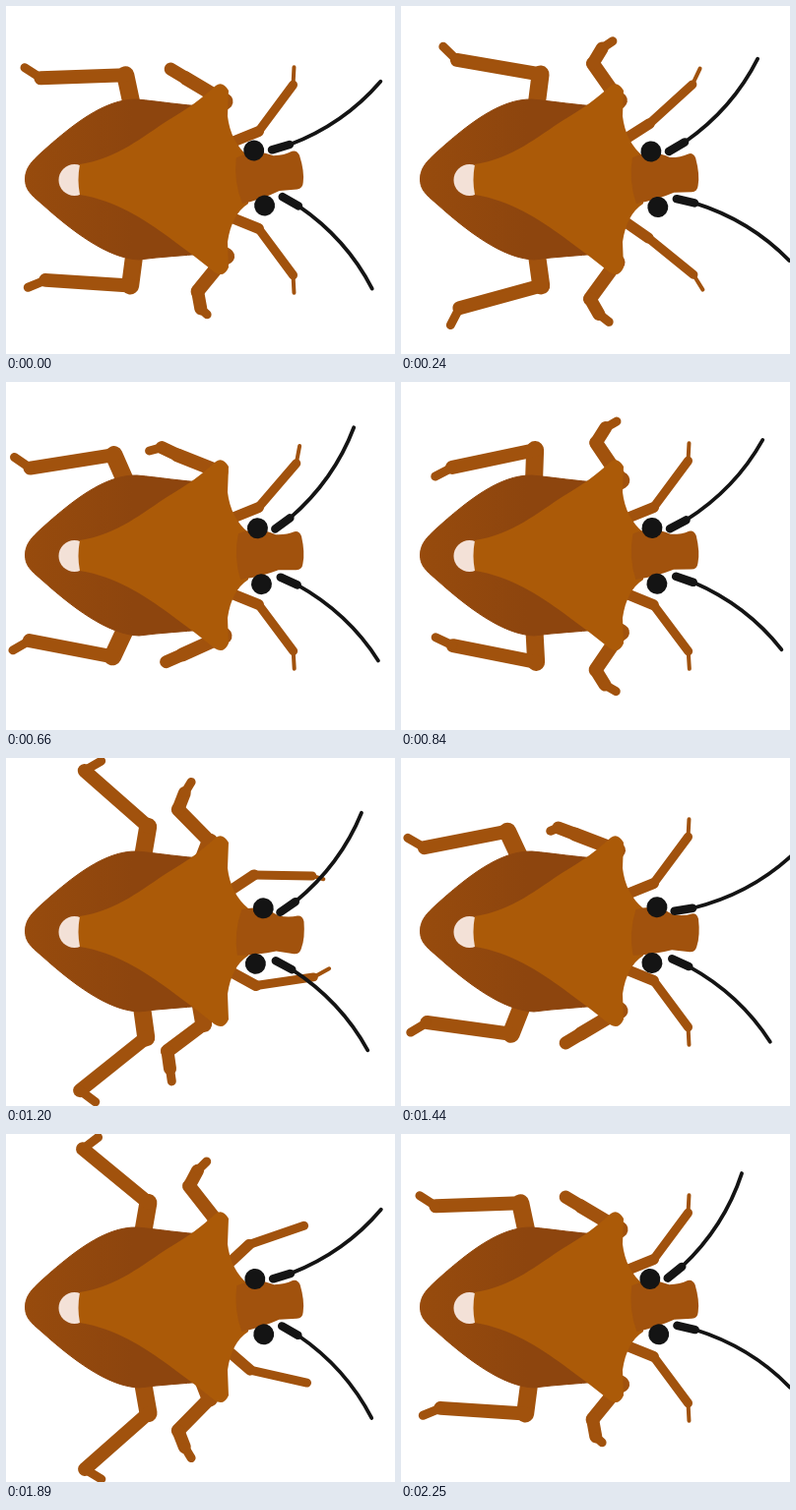
An HTML page that plays this animation: 395 by 354 pixels, repeating every 2280 ms.

```html
<!DOCTYPE html>
<html lang="en">
<head>
<meta charset="utf-8">
<title>Walking bug</title>
<style>
  html, body { margin: 0; width: 100%; height: 100%; overflow: hidden; background: #fff; }
  svg { display: block; width: 100%; height: 100%; }
  #legs { stroke: #a1520d; stroke-linecap: round; }
  .feeler { fill: none; stroke: #141414; stroke-linecap: round; }
</style>
</head>
<body>
<svg viewBox="0 0 395 354">
  <defs>
    <linearGradient id="shell">
      <stop offset="0" stop-color="#974b0d"/>
      <stop offset="0.6" stop-color="#8d450e"/>
    </linearGradient>
  </defs>
  <g id="legs"></g>
  <path fill="url(#shell)" stroke="url(#shell)" d="M19.500 176C19.500 165 26 158 36 149C66 122 100 94 133 95C155 97 180 101 200 102V252C180 254 158 255 135 258C103 257 66 228 36 201C24 191 19.500 186 19.500 176Z"/>
  <circle cx="69.500" cy="177" r="16" fill="#f3e1d7"/>
  <path fill="#ab5a08" d="M75 161C112 156 140 132 165 116C184 105 200 93 213 81Q220 76 226 86L225 112Q228 138 246 153V201Q229 212 225 240L226 266Q221 277 212 271C200 261 184 249 165 235C140 217 112 198 75 192Q72 177 75 161Z"/>
  <path id="snout" fill="#a1520d" d="M237 154Q257 147 275 157Q286 158 294 155Q299 154 301 160Q304 177 301 188Q300 194 294 194L276 193Q258 199 237 201Q231 178 237 154Z"/>
  <g id="face">
    <g id="upper"></g>
    <g id="lower"></g>
    <g fill="#141414">
      <circle cx="257.500" cy="150" r="10.500"/>
      <circle cx="257.500" cy="207" r="10.500"/>
    </g>
  </g>
</svg>
<script>
const LOOP = 2280, STEP = 30, STRIDE = 25, AXIS = 177;
const $ = id => document.getElementById(id);

function add(parent, tag, attrs) {
  const el = document.createElementNS('http://www.w3.org/2000/svg', tag);
  for (const k in attrs) el.setAttribute(k, attrs[k]);
  return parent.appendChild(el);
}

// Smooth motion through rows of [time, ...values], without overshoot.
function track(rows, period = 0) {
  const n = rows.length;
  const key = i => {
    if (!period) return rows[Math.max(0, Math.min(n - 1, i))];
    const [t, ...values] = rows[(i + n) % n];
    return [t + period * Math.floor(i / n), ...values];
  };
  const slope = (i, j) => {
    const a = key(i), b = key(i + 1);
    return b[0] > a[0] ? (b[j] - a[j]) / (b[0] - a[0]) : 0;
  };
  const tangent = (i, j) => {
    const a = slope(i - 1, j), b = slope(i, j);
    return a * b > 0 ? 2 * a * b / (a + b) : 0;
  };
  return t => {
    let i = n - 1;
    while (i >= 0 && rows[i][0] > t) i--;
    const [a, ...from] = key(i), [b, ...to] = key(i + 1), d = b - a;
    if (!d) return from;
    const s = (t - a) / d, ease = s * s * (3 - 2 * s);
    return from.map((v, j) => v + (to[j] - v) * ease
      + d * s * (1 - s) * ((1 - s) * tangent(i, j + 1) - s * tangent(i + 1, j + 1)));
  };
}

// One leg of each pair; poses are [beat, ...joint angles], hip is [x, distance from axis].
const kinds = [
  { hip: [134, 47], bones: [61, 86, 19.5], widths: [18, 14, 9], lead: 0.8,
    poses: [[0, 102, 182, 147], [3, 88, 192, 208], [14.5, 80, 138, 29], [23, 115, 191, 150]] },
  { hip: [195, 61], bones: [33, 46, 18, 13], widths: [17, 14, 13, 9], lead: 2, fold: 0,
    poses: [[0, 35, 149, 149, 110], [3, 29, 124, 58, 30], [13, 54, 128, 62, 45],
      [17, 80, 143, 82, 82], [23, 42, 159, 159, 202]] },
  { hip: [211, 31], bones: [49, 59, 18], widths: [11, 9, 4], lead: 0.8, fold: 13,
    poses: [[3, 22, 53.5, 87], [13, 43, 19, 19], [16.5, 26.5, -11, -33], [23, 22, 53.5, 87]] }
];

const legs = kinds.flatMap(kind => {
  const angles = track(kind.poses, STRIDE);
  return [-1, 1].map(side => ({
    ...kind, side, angles,
    lines: kind.widths.map(w => add($('legs'), 'line', { 'stroke-width': w }))
  }));
});

// The last bone tucks away around the fold beat.
function tuck(beat, fold) {
  if (fold === undefined) return 1;
  const gap = Math.abs(beat - fold), d = Math.min(gap, STRIDE - gap);
  return Math.max(0, Math.min(1, (d - 1) / 1.5));
}

function pose(leg, frame) {
  const beat = (frame + (leg.side > 0 ? leg.lead : 0)) % STRIDE;
  let x = leg.hip[0], y = AXIS + leg.side * leg.hip[1];
  leg.angles(beat).forEach((deg, i, all) => {
    const a = deg * Math.PI / 180;
    const len = leg.bones[i] * (i === all.length - 1 ? tuck(beat, leg.fold) : 1);
    const ends = { x1: x, y1: y, x2: x += len * Math.cos(a), y2: y += leg.side * len * Math.sin(a) };
    for (const k in ends) leg.lines[i].setAttribute(k, ends[k].toFixed(2));
  });
}

function feeler(id, flip) {
  const p = (x, y) => `${x} ${y * flip}`;
  const draw = (d, w) => add($(id), 'path', { class: 'feeler', d, 'stroke-width': w });
  draw(`M${p(2, 0.6)}L${p(20, 5.6)}`, 8.5);
  draw(`M${p(20, 5.6)}Q${p(78, 17)} ${p(132.5, 0)}`, 3.8);
}
feeler('upper', 1);
feeler('lower', -1);

// Time, head tilt, upper feeler rise, lower feeler drop.
const look = track([
  [0, 11, 32, 45.5],
  [240, 7, 46, 28.5],
  [480, 3, 60.5, 46],
  [840, 5, 43.5, 34.5],
  [1200, -8, 50.5, 44],
  [1440, -5, 25, 40],
  [1890, 9, 32.5, 45.5],
  [2250, 9, 54.5, 28.5]
]);

function render(ms) {
  const frame = Math.floor(ms % LOOP / STEP);
  for (const leg of legs) pose(leg, frame);
  const [tilt, rise, drop] = look(frame * STEP);
  const move = (id, value) => $(id).setAttribute('transform', value);
  move('snout', `rotate(${-0.7 * tilt} 239 178.5)`);
  move('face', `rotate(${-tilt} 239 178.5)`);
  move('upper', `translate(273.5 153) rotate(${tilt - rise})`);
  move('lower', `translate(275.4 200.4) rotate(${tilt + drop})`);
}

const start = performance.now();
function tick() {
  render(performance.now() - start);
  requestAnimationFrame(tick);
}
tick();
</script>
</body>
</html>
```
